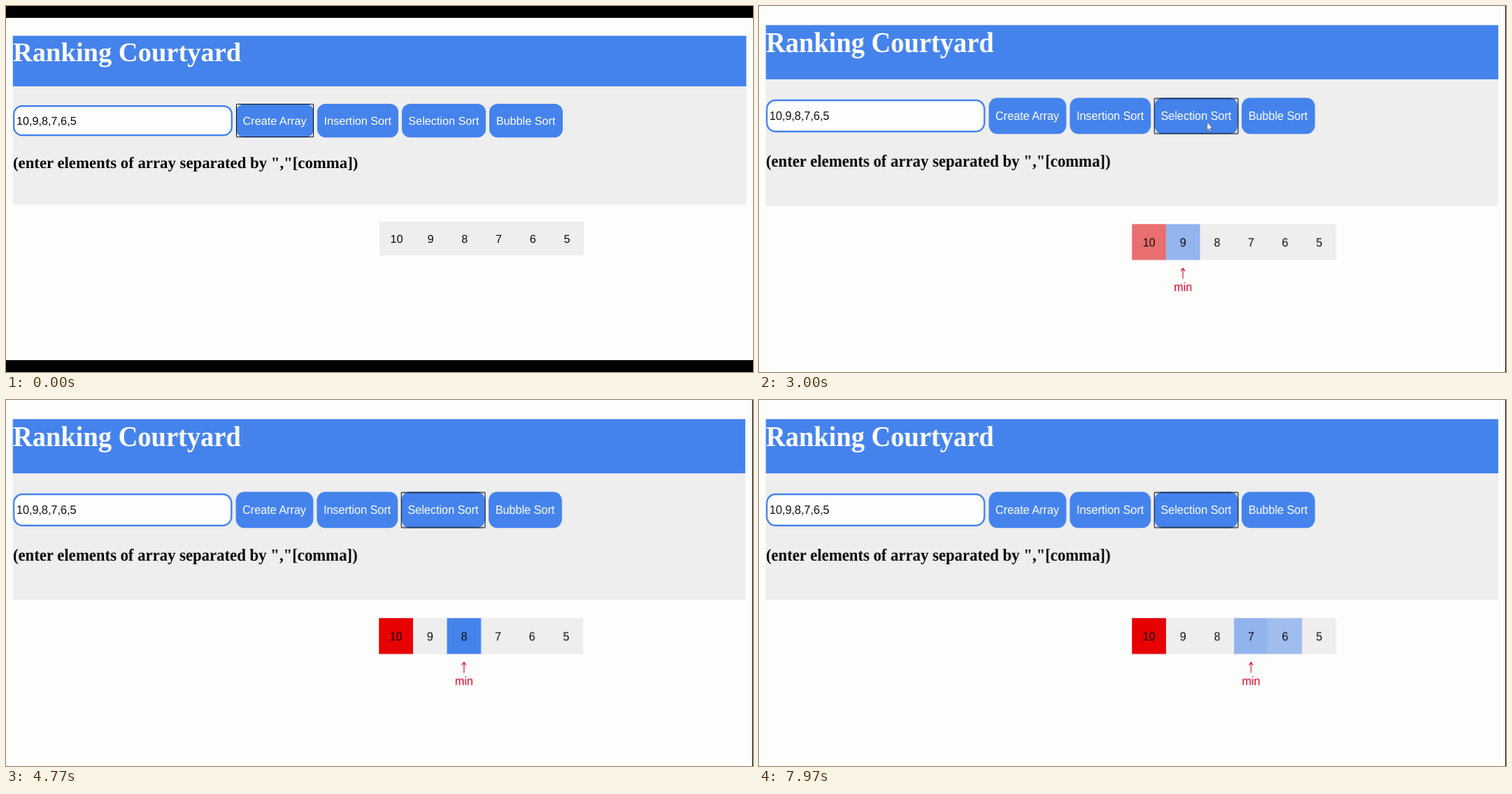
Animation, 1068 px wide and 524 px high, one loop 8 s. Source, as an HTML page:

```html
<!DOCTYPE html>
<html lang="en">
<head>
<meta charset="utf-8">
<title>Ranking Courtyard</title>
<style>
  html, body { margin: 0; width: 100%; height: 100%; overflow: hidden; background: #000; }
  svg { display: block; width: 1068px; height: 524px; }
  text { font: 16.23px "Liberation Sans", Arial, sans-serif; fill: #0c0c0c; text-rendering: geometricPrecision; }
  .serif { font-family: "Liberation Serif", "Times New Roman", serif; font-weight: bold; }
  .title { font-size: 38.5px; fill: #fff; }
  .hint { font-size: 22.78px; fill: #050505; }
  .mid text { text-anchor: middle; }
  .buttons text { fill: #fff; }
  .blue { fill: #4583ec; }
  .grey { fill: #eee; }
  .ring { fill: none; stroke: #0d1014; stroke-width: 1.1; }
  .label text { fill: #cc0022; }
  .label path { fill: none; stroke: #cc0022; stroke-width: 1.1; }

  .page, .ring, .label { animation: 8s step-end infinite; }
  .page { animation-name: zoom; }
  .ring.a { animation-name: blur; }
  .ring.b { animation-name: focus; }
  .label { animation-name: label; }
  .pointer { animation: pointer 8s linear infinite; }
  .fade { animation: 8s ease infinite; }
  .k0 { animation-name: k0; }
  .k1 { animation-name: k1; }
  .k2 { animation-name: k2; }
  .k3 { animation-name: k3; }
  .k4 { animation-name: k4; }

  @keyframes zoom {
    0% { transform: none; }
    34.625%, 100% { transform: matrix(.9986, 0, 0, 1.0695, 0, -18.2); }
  }
  @keyframes blur { 0% { opacity: 1; } 32.5%, 100% { opacity: 0; } }
  @keyframes focus { 0% { opacity: 0; } 32.5%, 100% { opacity: 1; } }
  @keyframes label {
    0% { opacity: 0; transform: translateX(0); }
    34.625% { opacity: 1; transform: translateX(0); }
    59.625% { opacity: 1; transform: translateX(48.7px); }
    84.625%, 100% { opacity: 1; transform: translateX(97.4px); }
  }
  @keyframes pointer {
    0%, 14.624% { opacity: 0; transform: translate(720px, 450px); }
    14.625% { opacity: 1; transform: translate(720px, 450px); animation-timing-function: ease-out; }
    24.125%, 25.3% { opacity: 1; transform: translate(648px, 174px); }
    26.25%, 59.124% { opacity: 1; transform: translate(641.5px, 172px); }
    59.125%, 100% { opacity: 0; transform: translate(641.5px, 172px); }
  }

  /* Fades cut by a hold or by the loop use the matching half of the ease curve. */
  @keyframes k0 {
    0%, 37.499% { opacity: 0; }
    37.5% { opacity: .5375; animation-timing-function: cubic-bezier(.182, .514, .455, 1); }
    43.825%, 100% { opacity: 1; }
  }
  @keyframes k1 {
    0%, 37.499% { opacity: 0; }
    37.5% { opacity: .5375; animation-timing-function: cubic-bezier(.182, .514, .455, 1); }
    43.825%, 47.125% { opacity: 1; }
    56.325%, 100% { opacity: 0; }
  }
  @keyframes k2 {
    0%, 47.125% { opacity: 0; }
    56.325%, 72.125% { opacity: 1; }
    81.325%, 100% { opacity: 0; }
  }
  @keyframes k3 {
    0%, 72.125% { opacity: 0; }
    81.325% { opacity: 1; }
    97.125% { opacity: 1; animation-timing-function: cubic-bezier(.4, .093, .6, .558); }
    100% { opacity: .4625; }
  }
  @keyframes k4 {
    0% { opacity: 0; }
    97.125% { opacity: 0; animation-timing-function: cubic-bezier(.4, .093, .6, .558); }
    100% { opacity: .5375; }
  }
</style>
</head>
<body>
<svg viewBox="0 0 1068 524">
  <g class="page">
    <rect y="17" width="1068" height="490" fill="#fdfdfc"/>
    <rect class="blue" x="9.8" y="42.6" width="1048.6" height="72.6"/>
    <rect class="grey" x="9.8" y="115.2" width="1048.6" height="169.3"/>
    <text class="serif title" x="10" y="78.5">Ranking Courtyard</text>

    <rect x="11.2" y="143.2" width="311.6" height="41.8" rx="12" fill="#fefefe" stroke="#4583ec" stroke-width="2.4"/>
    <text x="15" y="169.5">10,9,8,7,6,5</text>

    <g class="mid buttons">
      <rect class="blue" x="329" y="140" width="111" height="48.3" rx="12"/>
      <rect class="blue" x="445" y="140" width="116" height="48.3" rx="12"/>
      <rect class="blue" x="566" y="140" width="120" height="48.3" rx="12"/>
      <rect class="blue" x="691" y="140" width="105" height="48.3" rx="12"/>
      <text x="384.1" y="169.5">Create Array</text>
      <text x="502.8" y="169.5">Insertion Sort</text>
      <text x="625.8" y="169.5">Selection Sort</text>
      <text x="743.1" y="169.5">Bubble Sort</text>
    </g>
    <rect class="ring a" x="329.5" y="140.5" width="110" height="47" rx="1"/>
    <rect class="ring b" x="566.1" y="140.8" width="119.8" height="47" rx="1"/>

    <text class="serif hint" x="10" y="231.8">(enter elements of array separated by ","[comma])</text>

    <rect class="grey" x="534" y="309" width="292.2" height="48"/>
    <rect class="fade k0" x="534" y="309" width="48.7" height="48" fill="#e60000"/>
    <rect class="blue fade k1" x="582.7" y="309" width="48.7" height="48"/>
    <rect class="blue fade k2" x="631.4" y="309" width="48.7" height="48"/>
    <rect class="blue fade k3" x="680.1" y="309" width="48.7" height="48"/>
    <rect class="blue fade k4" x="728.8" y="309" width="48.7" height="48"/>
    <g class="mid">
      <text x="558.4" y="338.8">10</text>
      <text x="607.1" y="338.8">9</text>
      <text x="655.8" y="338.8">8</text>
      <text x="704.5" y="338.8">7</text>
      <text x="753.2" y="338.8">6</text>
      <text x="801.9" y="338.8">5</text>
    </g>

    <g class="mid label">
      <path d="M607 382.4V368.4M604 372.2L607 368L610 372.2"/>
      <text x="607.1" y="398.4">min</text>
    </g>

    <path class="pointer" d="M0 0V11.6L2.5 9.3L4.2 13.2L6 12.4L4.4 8.6H7.8Z" fill="#fff" stroke="#33405c" stroke-width=".7"/>
  </g>
</svg>
</body>
</html>
```
